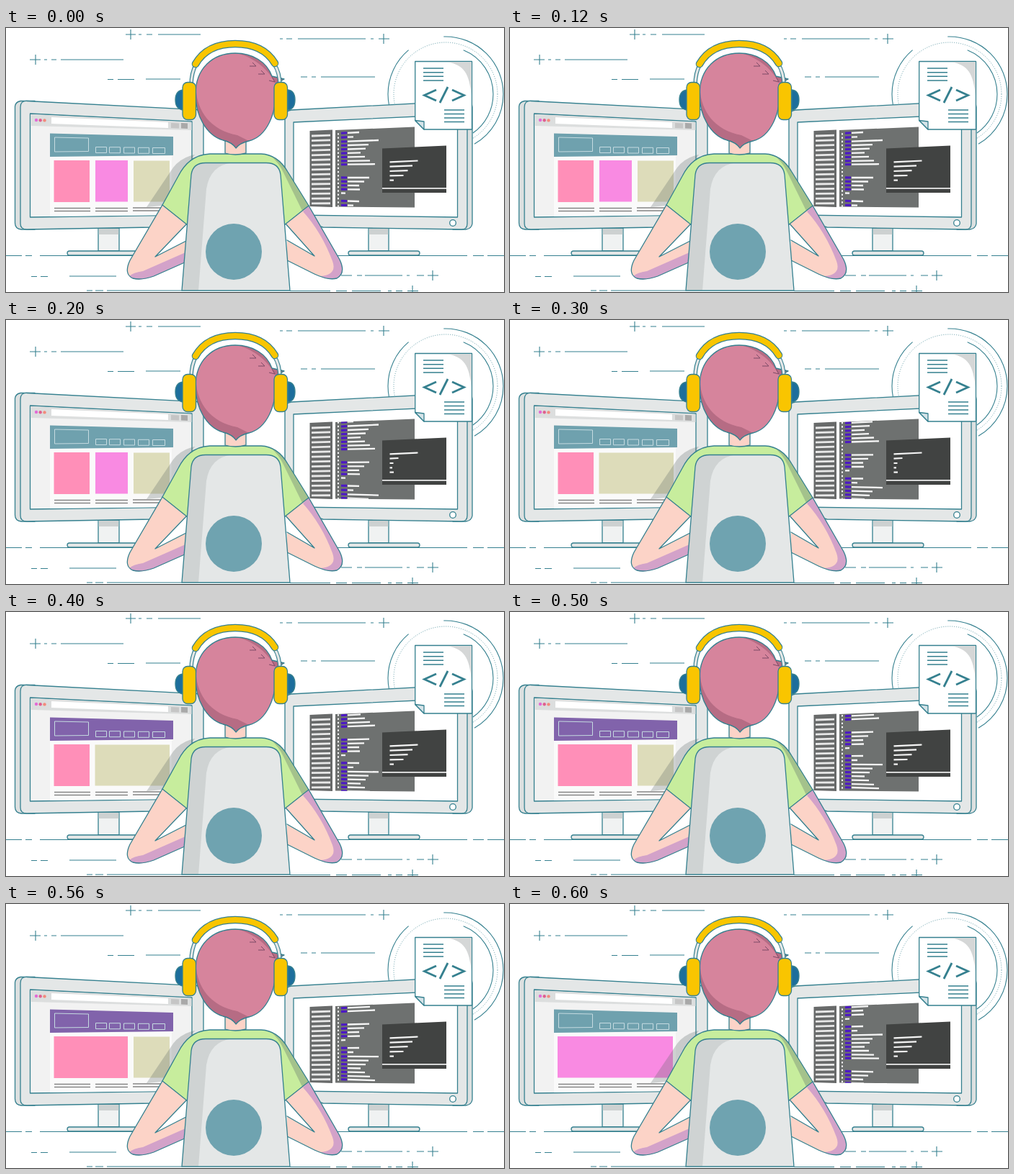
An HTML page for the animation above (700 ms loop, 691 px wide and 367 px high).

```html
<!DOCTYPE html>
<html lang="en">
<head>
<meta charset="utf-8">
<title>Developer at work</title>
<style>
  html, body { margin: 0; width: 100%; height: 100%; overflow: hidden; background: #fff; }
  svg { display: block; width: 100%; height: 100%; }
  .o { stroke: #35808f; stroke-width: 1.3; stroke-linejoin: round; stroke-linecap: round; }
  .l { fill: none; stroke: #35808f; stroke-width: 1.1; }
  .n { fill: none; }
  .skin { fill: #fcd3c7; }
  .gold { fill: #f9c500; }
  .metal { fill: #e4e7e7; }

  .head, .pink, .magenta, .tan, .slot, .long, .short {
    animation: 700ms step-end infinite;
  }
  .head { fill: #6fa1ae; animation-name: head; }
  .pink { fill: #ff8fb8; animation-name: pink; }
  .magenta { fill: #f98ae2; animation-name: magenta; }
  .tan { fill: #dddcba; animation-name: tan; }
  .slot { visibility: hidden; animation-name: slot; }
  .long { animation-name: long; }
  .short { animation-name: short; }

  @keyframes head { 0%, 85.71% { fill: #6fa1ae } 57.14% { fill: #8163ab } }
  @keyframes pink {
    0% { width: 49.5px; visibility: visible }
    71.42% { width: 102.5px; visibility: visible }
    85.71%, 100% { visibility: hidden }
  }
  @keyframes magenta {
    0% { x: 124px; width: 45px; visibility: visible }
    42.85% { x: 124px; width: 45px; visibility: hidden }
    85.71%, 100% { x: 66px; width: 160px; visibility: visible }
  }
  @keyframes tan {
    0%, 71.42% { x: 177px; width: 50px; visibility: visible }
    42.85% { x: 123.5px; width: 103.5px; visibility: visible }
    85.71%, 100% { visibility: hidden }
  }
  @keyframes slot { 0% { visibility: visible } 14.2857%, 100% { visibility: hidden } }
  @keyframes long { 0%, 57.14%, 100% { visibility: visible } 28.57% { visibility: hidden } }
  @keyframes short { 0%, 57.14%, 100% { visibility: hidden } 28.57% { visibility: visible } }
</style>
</head>
<body>
<svg viewBox="0 0 691 367" preserveAspectRatio="none">
  <defs>
    <clipPath id="pane"><path d="M457 142L567 137.500V249.500L457 248.500Z"/></clipPath>
  </defs>

  <!-- loose lines around the scene -->
  <path class="l" d="M166 9H180M173 2V16M184 9H188M195 9H203M211 9H270
    M33 44H48M41 37V51M53 44H57M63 44H70M76 44H163M141 71.500H149M155 71.500H178M194 71H242
    M380 15H384M389 15H397M405 15H499M506 15H510M517 15H532M524 8V22M409 68H418M424 68H430M437 68H512
    M35 345.500H43M48 345.500H58M88 345H153M112 365H120M124 365H135M140 365H244
    M465 344H480M487 344H494M498 344H550M556 344H560M570 344H580M585 344H600M592 337V351
    M394 365.500H450M458 365.500H473M480 365.500H520M530 365.500H535M541 365.500H550M557 365.500H572M564 358V367
    M0 316.500H22M27 316.500H36M47 316.500H640M648 316.500H663M668 316.500H691"/>

  <!-- rings: pathLength lets the dashes be read as degrees -->
  <g class="l">
    <circle cx="610" cy="92" r="80" pathLength="360" stroke-dasharray="60 108 62 38 92"/>
    <circle cx="610" cy="92" r="72" stroke-dasharray="1 2" stroke-width=".8"/>
    <circle cx="610" cy="92" r="66" pathLength="360" stroke-dasharray="55 237 68"/>
  </g>

  <!-- left monitor -->
  <path class="o" fill="#f0f2f2" d="M128 278H157V310H128Z"/>
  <path fill="#cdd1d1" d="M128.700 279H156.300V287H128.700Z"/>
  <rect class="o metal" x="85" y="310" width="97" height="6" rx="3"/>
  <path class="o" fill="#dce0e0" d="M12.500 109Q13 103 20 101.500H40V280H21Q12.500 279 12.500 271Z"/>
  <path class="o metal" d="M20 110Q20 101 29 101.500L265 113.500Q274 114.500 274 123V262L203 277L29 280Q20 280 20 272Z"/>
  <path class="o" fill="#f2f2f2" d="M33.500 119L258 130V260L33.500 263Z"/>
  <path fill="#fafafa" d="M61 178H230V260L61 262Z"/>
  <path fill="#dcdede" d="M34.500 120L257.500 131V142L34.500 136Z"/>
  <path fill="#fff" d="M63 124L225 131V139L63 133Z"/>
  <circle cx="42" cy="128" r="2.200" fill="#e36ad6"/>
  <circle cx="47.700" cy="128.200" r="2.200" fill="#e0608f"/>
  <circle cx="53.500" cy="128.400" r="2.200" fill="#f28a7c"/>
  <path fill="#c5c5c5" d="M229 132L240 132.500V139.500L229 139Z"/>
  <path fill="#a9a9a9" d="M243 132L252 132.500V140L243 139.500Z"/>
  <path class="head" d="M61 146.500L232 151V177L61 179Z"/>
  <g fill="none" stroke="#c5dbe1" stroke-width="1">
    <path d="M67.500 152L114.500 153V171.500L67.500 172Z"/>
    <path d="M124.500 165.500h15v8h-15zM143.500 165.700h15v8h-15zM163.500 166h15v8h-15zM183.500 166.300h15v8h-15zM203.500 166.500h17v8h-17z"/>
  </g>
  <rect class="pink" x="66.500" y="184" width="49.500" height="58"/>
  <rect class="magenta" x="124" y="184" width="45" height="57.500"/>
  <rect class="tan" x="177" y="184.500" width="50" height="57"/>
  <path fill="none" stroke="#858585" stroke-width="1.500"
    d="M67 250.500H117M67 254.500H117M124 250.500H169M124 254.500H169M176 250H225M176 254H225"/>

  <!-- right monitor -->
  <path class="o" fill="#f0f2f2" d="M503 278H531V310H503Z"/>
  <path fill="#cdd1d1" d="M503.700 279H530.300V287H503.700Z"/>
  <rect class="o metal" x="475" y="310" width="99" height="6" rx="3"/>
  <path class="o" fill="#dce0e0" d="M620 101.500H640Q647 103 647 110V272Q646 279 638 280H620Z"/>
  <path class="o metal" d="M387 124Q387 115 396 114L632 101.500Q640 101.500 640 110V272Q640 280 632 280L440 277L387 262Z"/>
  <path class="o" fill="#fff" d="M399 131L626.500 120.500V263L399 260Z"/>
  <circle class="o" cx="620" cy="271" r="4.300" fill="#fff"/>
  <path fill="#686a6a" d="M421.500 143L453 141.500V249L421.500 248Z"/>
  <path id="side" fill="none" stroke="#e8e8e8" stroke-width="2.800"/>
  <path fill="#6e7170" d="M457 142L567 137.500V249.500L457 248.500Z"/>
  <g id="code" clip-path="url(#pane)" fill="none" stroke-width="2.300"></g>
  <path fill="#414342" d="M522 167.500L611 163.500V229H522Z"/>
  <path fill="#ececec" d="M522 222H611V223.700H522Z"/>
  <g fill="none" stroke="#f4f4f4" stroke-width="2.200">
    <path d="M532.500 186.300L571.500 184.500M532.500 211.700H538"/>
    <path class="long" d="M532.500 192.600L564 191.300M532.500 199L557.500 198.200M532.500 205.400L551.500 205"/>
    <path class="short" d="M532.500 192.600L544.500 192M532.500 199H537.500M532.500 205.400H536"/>
  </g>

  <!-- document -->
  <g>
    <path class="o" fill="#fff" d="M567.700 46.500H646.500V141H580L567.700 128.500Z"/>
    <path fill="#d5d7d7" d="M612 47.200H645.800V94C643 64 636 51 612 47.200Z"/>
    <path class="o" fill="#d5e3e8" d="M567.700 128.500L580 130V141Z"/>
    <path class="l" style="stroke-width:1.500" d="M579 56H607M579 61.700H607M579 67.300H607M579 73H607M608 114H636M608 119.500H636M608 125H636M608 130.500H636"/>
    <path class="n" stroke="#35808f" stroke-width="2.800" d="M597 86L580.500 93.500L597 101M602 104L613 82M619 86L635.500 93.500L619 101"/>
  </g>

  <!-- soft shade beside the left shoulder -->
  <path fill="#5c6666" opacity=".28" d="M195 249L232 194Q243 180 262 176L240 206L217 247Z"/>

  <!-- arms, shirt, neck -->
  <path class="skin" d="M217 246L172 323Q163 342 176 348Q188 351 205 345L250 325V296L207 318L252 271Z"/>
  <path fill="#d3a2c9" d="M171 345Q176 340 190 338L249 312V325L205 345Q180 354 171 345Z"/>
  <path class="o n" d="M217 246L172 323Q163 342 176 348Q188 351 205 345L250 325M250 296L207 318L252 271"/>
  <path class="skin" d="M420 247L463 322Q472 341 459 348Q447 351 428 342L390 323V295L428 317L387 271Z"/>
  <path fill="#d3a2c9" d="M420 247L463 322Q472 341 459 348Q448 350 436 345Q460 343 453 324Q438 284 412 255Z"/>
  <path class="o n" d="M420 247L463 322Q472 341 459 348Q447 351 428 342L390 323M390 295L428 317L387 271"/>
  <path fill="#c7ed9d" d="M217 246L239 206Q254 176 283 175H354Q377 176 391 200L420 247L386 274H252Z"/>
  <path fill="#5c6666" opacity=".32" d="M366 177Q381 183 391 200L420 247L411 254L385 201Q378 186 366 177Z"/>
  <path class="o n" d="M217 246L239 206Q254 176 283 175H354Q377 176 391 200L420 247L386 274H252Z"/>
  <path class="o skin" d="M304 150V174Q318 178 333 174V150Z"/>

  <!-- chair -->
  <path class="metal" d="M244 365L257 204Q259 187.500 277 187.500H361Q379 187.500 381 204L394 365Z"/>
  <path fill="#cfd3d3" d="M244 365L257 204Q259 187.500 277 187.500H313Q283 191 278 224L267 365Z"/>
  <path class="o n" d="M244 365L257 204Q259 187.500 277 187.500H361Q379 187.500 381 204L394 365Z"/>
  <circle cx="316" cy="311" r="39" fill="#6fa3b0"/>

  <!-- hair -->
  <path fill="#d6849c" d="M319 167Q314 159 301 156C278 149 263 122 263 92C263 56 287 35 318 35C342 35 362 47 369 67L386 71L374 78C377 120 361 151 337 157Q324 160 319 167Z"/>
  <path fill="#b66c84" d="M263.500 84C265 116 284 142 321 149L337 157Q324 160 319 167Q314 159 301 156C276 148 261 118 263.500 84Z"/>
  <path fill="#b66c84" d="M322 35.500C344 36 362 48 369 67L385 71L374 77C364 58 346 42 322 35.500Z"/>
  <path class="o n" d="M319 167Q314 159 301 156C278 149 263 122 263 92C263 56 287 35 318 35C342 35 362 47 369 67L386 71L374 78C377 120 361 151 337 157Q324 160 319 167Z"/>
  <path class="n" stroke="#7d4a66" stroke-width="1" d="M338 53L347 53L342 48M350 64L359 64L354 59M365 73L373 75L369 68"/>

  <!-- headphones -->
  <path class="n" stroke="#35808f" stroke-width="5.500" d="M264 50Q257 62 257 80M372 50Q380 62 380 80"/>
  <path class="n" stroke="#e4e7e7" stroke-width="3.200" d="M264 50Q257 62 257 80M372 50Q380 62 380 80"/>
  <path class="n" stroke="#35808f" stroke-width="10.600" stroke-linecap="round" d="M263 50Q279 22 318 22Q357 22 373 49"/>
  <path class="n" stroke="#f9c500" stroke-width="8.200" stroke-linecap="round" d="M263 50Q279 22 318 22Q357 22 373 49"/>
  <path class="o" fill="#1d6e9c" d="M246 86Q235 87 235 100Q235 113 246 114ZM391 86Q401 87 401 100Q401 113 391 114Z"/>
  <rect class="o gold" x="245" y="75.500" width="18.500" height="52" rx="7"/>
  <rect class="o gold" x="372" y="75.500" width="18.500" height="52" rx="7"/>
</svg>
<script>
  const NS = "http://www.w3.org/2000/svg";
  const rows = [[145, 490], [151, 482], [157, 517], [162.5, 503], [168, 499], [173.5, 492], [179, 498],
    [184.5, 505], [189.5, 512], [208, 504], [213.5, 497], [219, 490], [224.5, 491], [230, 471]];
  const period = 96;
  const scroll = [0, 0, 10.2, 20.5, 31, 41, 71];   // one per 100 ms
  const tilt = y => (y - 205) * 0.0008;

  const seg = (x1, x2, y) => {
    const at = x => (y + (x - 490) * tilt(y)).toFixed(1);
    return `M${x1} ${at(x1)}L${x2} ${at(x2)}`;
  };

  function add(parent, name, attrs) {
    const el = document.createElementNS(NS, name);
    for (const k in attrs) el.setAttribute(k, attrs[k]);
    return parent.appendChild(el);
  }

  const code = document.getElementById("code");
  scroll.forEach((off, i) => {
    let keys = "", text = "", marks = "";
    for (let lap = 0; lap < 3; lap++) {
      for (const [y0, end] of rows) {
        const y = y0 + lap * period - off;
        if (y < 138 || y > 252) continue;
        if (end > 475) {
          keys += seg(465, 473, y);
          text += seg(474, end, y);
        } else text += seg(465, end, y);
      }
    }
    for (let y = 146 - off % 5.4; y < 250; y += 5.4) marks += seg(460, 462, y);
    const g = add(code, "g", { class: "slot", style: `animation-delay:${i * 100 - 700}ms` });
    add(g, "path", { d: keys, stroke: "#4c18c4", "stroke-width": 3.1 });
    add(g, "path", { d: text + marks, stroke: "#f6f6f6" });
  });

  let side = "";
  for (let i = 0; i < 15; i++) {
    const y = 149.5 + i * 6.7;
    side += `M424 ${y + 0.5}L450 ${y - 0.4 + i * 0.06}`;
  }
  document.getElementById("side").setAttribute("d", side);
</script>
</body>
</html>
```
